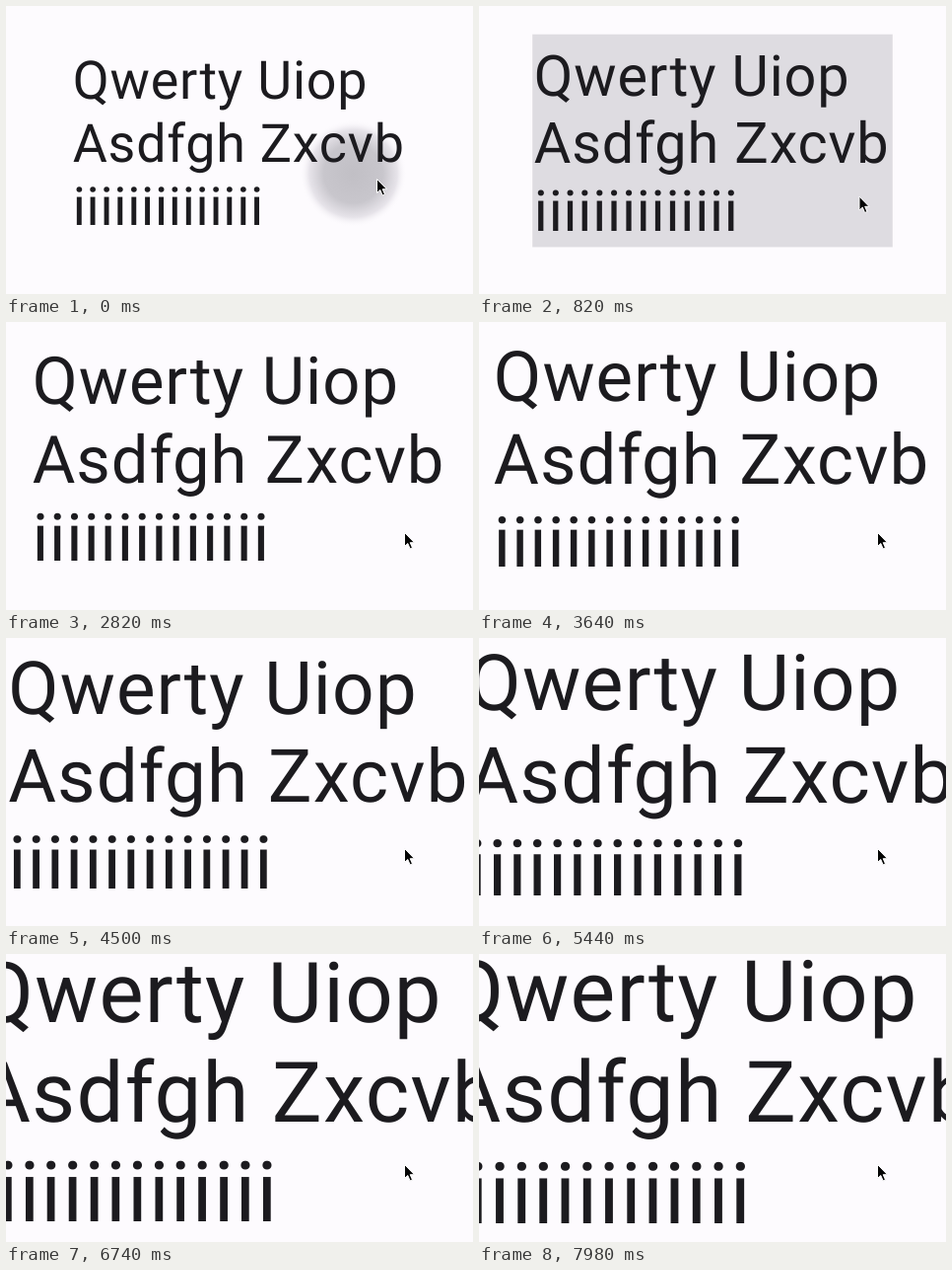
These frames come from a looping animation (474 by 292 pixels, 8 s). An HTML page:

```html
<!DOCTYPE html>
<html lang="en">
<head>
<meta charset="utf-8">
<title>Growing text</title>
<style>
  html, body { margin: 0; width: 100%; height: 100%; overflow: hidden; background: #fdfbfe; }
  svg { display: block; width: 474px; height: 292px; }
  text { font: 400 100px Roboto, sans-serif; letter-spacing: 1.45px; fill: #1c1b1f; text-rendering: geometricPrecision; }
</style>
</head>
<body>
<svg viewBox="0 0 474 292">
  <defs>
    <radialGradient id="soft">
      <stop offset="0" stop-color="#c1bfc5"/>
      <stop offset=".55" stop-color="#c8c6cc"/>
      <stop offset=".82" stop-color="#e6e3e9"/>
      <stop offset="1" stop-color="#fdfbfe" stop-opacity="0"/>
    </radialGradient>
    <clipPath id="bounds"><rect id="clip"/></clipPath>
  </defs>
  <rect id="highlight" fill="#dedce1"/>
  <g clip-path="url(#bounds)"><circle id="ripple" fill="url(#soft)"/></g>
  <g id="lines">
    <text x="-314.4" y="-80.9">Qwerty Uiop</text>
    <text x="-314.4" y="38">Asdfgh Zxcvb</text>
    <text x="-314.4" y="156.9">iiiiiiiiiiiiii</text>
  </g>
  <path id="cursor" d="M0 0V14L3.3 11L5.6 16.4L8 15.4L5.7 10.2H10Z" fill="#050505" stroke="#fff"/>
</svg>
<script>
const LOOP = 8000;
const CENTER = { x: 237, y: 137.3 };
const [highlight, clip, ripple, lines, cursor] =
  ["highlight", "clip", "ripple", "lines", "cursor"].map(id => document.getElementById(id));

const progress = (t, from, to) => Math.min(1, Math.max(0, (t - from) / (to - from)));
const mix = (a, b, p) => a + (b - a) * p;
const easeOut = p => 1 - (1 - p) ** 2;

function set(element, attributes) {
  for (const name in attributes) element.setAttribute(name, attributes[name]);
}

function draw(t) {
  const size = Math.min(86.2, 53.84 + 0.00463 * t);
  set(lines, { transform: `translate(${CENTER.x} ${CENTER.y}) scale(${size / 100})` });

  const box = {
    x: CENTER.x - 3.171 * size,
    y: CENTER.y - 1.884 * size,
    width: 6.342 * size,
    height: 3.743 * size
  };
  set(clip, box);
  set(highlight, { ...box, opacity: progress(t, 0, 200) - progress(t, 2450, 2650) });

  const spread = easeOut(progress(t, 0, 450));
  set(ripple, {
    cx: mix(353, CENTER.x, spread),
    cy: mix(170, CENTER.y, spread),
    r: mix(53, 330, spread),
    opacity: 1 - progress(t, 100, 520)
  });

  const first = progress(t, 0, 1560), second = progress(t, 1560, 2500);
  const x = 376.5 + 18 * first + 10 * second;
  const y = 175.5 + 33.5 * first + 4.5 * second;
  set(cursor, { transform: `translate(${x} ${y})` });
}

const start = performance.now();
function tick() {
  draw((performance.now() - start) % LOOP);
  requestAnimationFrame(tick);
}
draw(0);
requestAnimationFrame(tick);
</script>
</body>
</html>
```
